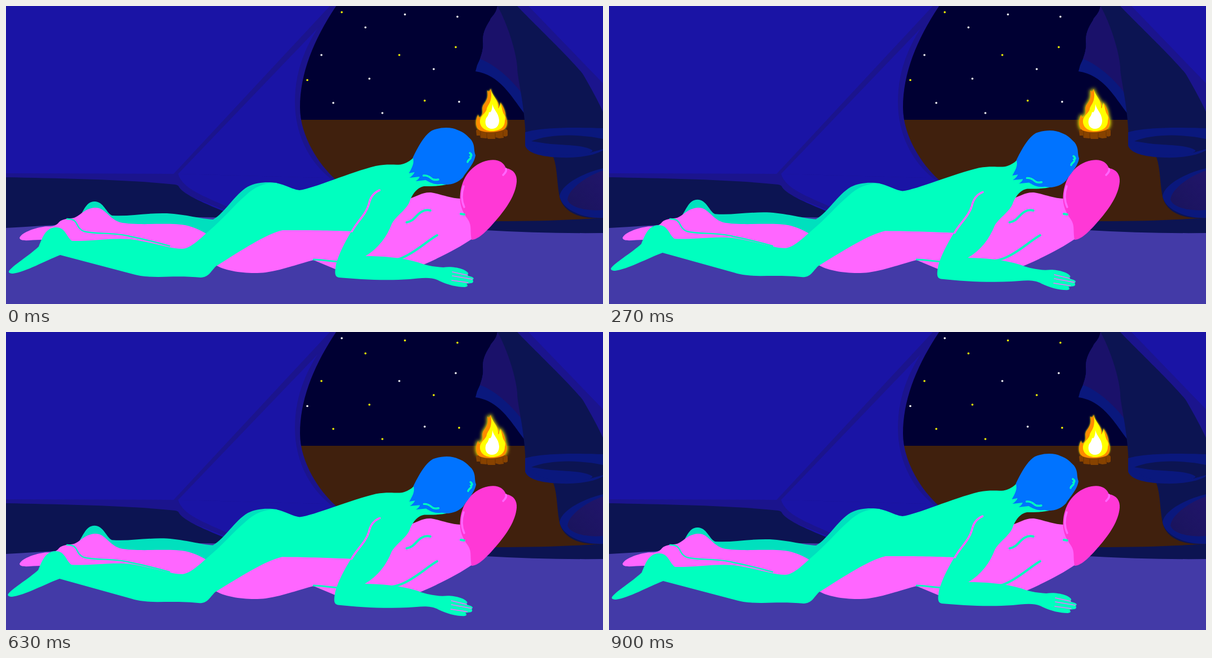
Recreate the animation shown at these times as an HTML page. Size 1058 px wide and 529 px high, loop 930 ms.

```html
<!DOCTYPE html>
<html lang="en">
<head>
<meta charset="utf-8">
<title>Campfire tent</title>
<style>
html, body { margin: 0; width: 100%; height: 100%; overflow: hidden; background: #1a14a5; }
svg { display: block; width: 100%; height: 100%; }
.line { fill: none; stroke-linecap: round; }
</style>
</head>
<body>
<svg viewBox="0 0 1058 529" preserveAspectRatio="none">
  <defs>
    <clipPath id="door">
      <path d="M585 0C545 60 521 120 521 180C521 225 548 275 584 308C640 350 760 385 868 382C940 382 1000 380 1058 376V200L900 0Z"/>
    </clipPath>
    <filter id="soft" x="-60%" y="-60%" width="220%" height="220%">
      <feGaussianBlur id="blur" stdDeviation="2"/>
    </filter>
    <linearGradient id="fold" x1="0" y1="1" x2="1" y2="0">
      <stop offset="0" stop-color="#19145c"/>
      <stop offset="1" stop-color="#21156a"/>
    </linearGradient>
    <path id="flame" d="M853 150C856 154 857 151 859 147C861 160 873 166 874 180C877 178 877 174 876 171C882 180 885 188 885 195C889 204 889 215 881 220C868 225 850 225 840 221C831 216 832 201 837 193C837 198 839 199 841 197C848 190 842 184 846 176C850 170 856 164 853 150Z"/>
  </defs>

  <!-- tent wall -->
  <rect width="1058" height="529" fill="#1a14a5"/>
  <path d="M0 297L297 298L574 0H590L550 42L305 298L330 328L420 375L306 330L0 310Z" fill="#1b148d"/>
  <path d="M0 304C110 306 230 309 300 317Q306 318 307 322C316 335 350 350 400 370L600 390L1058 370V420H0Z" fill="#0c1452"/>
  <path d="M305 298C310 325 345 340 400 368H600V306Z" fill="#1b148d"/>
  <path d="M305 298C313 325 350 337 400 360H600V306Z" fill="#1a14a5"/>
  <path d="M582 0C535 55 512 110 512 170C512 225 535 275 576 307L620 330L640 0Z" fill="#1b148d"/>
  <path d="M0 394C110 388 230 378 345 375L420 376L850 398Q950 404 1058 403V529H0Z" fill="#433aa7"/>

  <!-- doorway -->
  <g clip-path="url(#door)">
    <rect x="500" width="558" height="203" fill="#000033"/>
    <rect x="500" y="202" width="558" height="200" fill="#40200d"/>
  </g>
  <g id="stars"></g>

  <!-- campfire -->
  <use id="glow" href="#flame" fill="#ff0" stroke="#ff0" stroke-linejoin="round" filter="url(#soft)"/>
  <path d="M833 221Q836 217 842 220H880Q887 217 889 221V230Q886 233 882 231V234L874 235L867 233V236H854L852 233V235L841 234L840 230L834 230Z" fill="#874200"/>
  <path d="M841 223V232M852 226V234M867 226V235M881 223V232" class="line" stroke="#6b3200"/>
  <use href="#flame" fill="#ff8c00"/>
  <path d="M859 147C861 160 874 167 872 182Q876 179 876 172C880 182 879 187 883 193Q886 197 884 204C884 215 875 222 861 222C847 222 839 213 840 203C841 194 852 189 852 182C855 174 863 168 859 147Z" fill="#ff0"/>
  <path d="M853 150C858 164 849 171 845 178Q843 184 848 191C848 181 858 175 859 165Q858 155 853 150Z" fill="#ff8c00"/>
  <path d="M862 174C864 185 873 189 874 203C874 212 869 218 861 218C853 218 848 211 850 202C851 197 855 196 856 188C859 191 862 184 862 174Z" fill="#fff"/>

  <!-- curtain -->
  <path d="M890 0H926L1058 137V195L1000 200Z" fill="#1b148d"/>
  <path d="M926 0H1058V137Z" fill="#1a14a5"/>
  <path d="M871 0C868 16 860 18 858 25C848 40 845 50 845 62C847 75 842 88 840 94L835 105L832 116C875 122 895 160 918 190L925 100Z" fill="#0a187d"/>
  <path d="M871 0C868 16 860 18 858 25C848 40 845 50 845 62C847 75 842 88 840 94C870 105 900 135 918 160L915 60Z" fill="#1a116a"/>
  <path d="M871 0H906C932 28 1008 100 1023 122C1038 148 1050 170 1058 188V376C1020 379 990 368 982 342C976 320 978 290 970 268L921 235C919 170 906 130 906 108C904 80 888 30 871 0Z" fill="#0c1452"/>
  <path d="M920 224C950 215 1010 215 1058 217V256C1045 265 1015 270 985 269C950 268 925 262 920 248Z" fill="#0a187d"/>
  <path d="M931 240C960 228 1010 226 1058 236V254L1036 260L1010 252Z" fill="#0c1452"/>
  <path d="M931 241C965 248 1022 244 1039 256C1043 264 985 265 967 263C947 259 936 250 931 241Z" fill="#0a187d"/>
  <path d="M1058 288C1020 297 983 318 981 338C986 362 1024 378 1058 376Z" fill="#0a187d"/>
  <path d="M1058 292C1026 303 996 326 995 344C1000 358 1030 365 1058 362Z" fill="url(#fold)"/>

  <!-- far leg -->
  <g class="sway">
    <path d="M125 382C137 368 140 347 157 347C173 347 178 368 188 372C220 374 250 367 285 368C320 370 345 378 367 379C388 367 405 335 428 321C444 312 465 312 480 314L470 350L380 410H340L200 395Z" fill="#00e0be"/>
  </g>

  <!-- lying figure -->
  <path d="M24 412C26 403 50 394 66 392C76 390 83 394 92 386C98 378 107 378 114 377C130 377 135 360 157 358C176 357 181 377 202 384C235 391 290 383 322 390C343 396 352 402 365 411L480 380L715 342C728 338 738 330 753 331C768 333 785 341 806 342L850 385L825 414C800 431 760 452 715 469L588 469L545 451C520 457 490 469 460 473C430 476 390 472 370 459L300 440L110 420L62 415C44 415 26 419 24 412Z" fill="#ff66ff"/>
  <path d="M825 415C822 396 826 390 818 378C808 365 803 350 805 333C808 305 825 280 855 274C870 271 882 276 886 288C900 290 906 300 905 312C903 335 888 358 868 381C855 396 838 415 825 415Z" fill="#ff38d6"/>
  <g class="line" stroke="#ff66ff" stroke-width="3.5">
    <path d="M811 320C806 335 808 348 812 357"/>
    <path d="M886 289C888 293 884 297 881 300"/>
  </g>
  <g class="line" stroke="#00ffbf" stroke-width="4">
    <path d="M108 378C131 378 121 393 138 400C160 406 190 401 220 409C245 414 262 418 290 426" stroke-width="2.4"/>
    <path d="M545 450C562 450 574 454 600 454" stroke-width="3"/>
    <path d="M710 384C725 381 727 370 737 365Q744 361 752 363"/>
    <path d="M764 407C745 418 726 437 702 447Q690 452 675 453"/>
    <path d="M806 369L812 370"/>
  </g>

  <!-- upper figure -->
  <g class="sway">
    <path d="M5 471C11 461 40 444 58 427C65 410 70 394 88 393C105 392 107 410 117 417C150 418 190 411 220 414C260 419 290 431 312 431C327 431 345 412 360 399C385 378 402 356 425 336C440 321 460 313 478 314C495 317 508 326 520 327C545 324 610 295 655 284C680 279 695 284 705 280Q716 276 722 269L740 290L785 316C770 320 755 320 741 320C728 322 720 335 716 345C712 360 692 372 684 386C675 410 660 430 637 444C665 444 700 446 730 455C745 461 760 463 775 464C793 461 815 467 819 474Q820 478 813 477L826 481Q831 484 827 486Q830 491 824 492L816 493Q821 498 813 499C799 499 783 495 768 488C755 480 735 483 715 485C670 488 625 485 590 482C581 481 583 470 585 458C590 440 600 420 612 400C590 399 540 398 490 398C460 405 420 432 372 462C362 472 360 481 345 482C325 480 300 480 270 481C250 481 235 479 225 476L96 442C70 452 35 472 12 475Q4 475 5 471Z" fill="#00ffbf"/>
    <path d="M721 269C730 250 742 228 755 221C772 214 790 215 800 220C812 224 818 231 824 237C832 248 828 255 832 265C830 280 815 295 810 304C800 315 785 319 772 316C760 318 750 313 744 309L726 311Q732 307 733 303L715 305Q722 300 724 295L714 297C720 286 724 279 721 269Z" fill="#0073ff"/>
    <g class="line" stroke="#00ffbf" stroke-width="3.4">
      <path d="M822 261C825 263 826 266 823 267C826 271 819 272 818 277"/>
      <path d="M740 301C750 300 752 306 757 308Q762 309 766 308"/>
    </g>
    <g class="line" stroke="#ff66ff" stroke-width="3.6">
      <path d="M662 327C650 332 645 342 643 352C638 370 622 383 613 400"/>
      <path d="M791 472L818 478M791 479L826 485M790 487L819 491" stroke-width="1.6"/>
    </g>
  </g>
</svg>
<script>
const STEP = 30, LOOP = 930, HALF = 450, TILT = 1.24;
const groups = [
  [[595, 11], [797, 73], [697, 87], [534, 131.5], [742, 168]],
  [[707, 15], [800, 19], [637, 38], [559, 87], [758, 112], [644, 129], [580, 172], [667, 190], [803, 170]]
];
const $ = id => document.getElementById(id);
const sway = document.querySelectorAll('.sway');

const stars = groups.map(points => {
  const g = document.createElementNS('http://www.w3.org/2000/svg', 'g');
  g.innerHTML = points.map(([x, y]) => `<circle cx="${x}" cy="${y}" r="1.8"/>`).join('');
  $('stars').append(g);
  return g;
});

function draw(ms) {
  const t = Math.floor(ms % LOOP / STEP) * STEP;
  const p = 1 - Math.abs(t - HALF) / HALF;
  sway.forEach(g => g.setAttribute('transform', `rotate(${TILT * p} 400 352)`));
  const swapped = t >= HALF ? 1 : 0;
  stars.forEach((g, i) => g.setAttribute('fill', i === swapped ? '#ff0' : '#fff'));
  $('glow').setAttribute('stroke-width', 0.5 + 3 * p);
  $('blur').setAttribute('stdDeviation', 1.6 + 2.6 * p);
}

let start;
function tick(now) {
  start ??= now;
  draw(now - start);
  requestAnimationFrame(tick);
}
draw(0);
requestAnimationFrame(tick);
</script>
</body>
</html>
```
